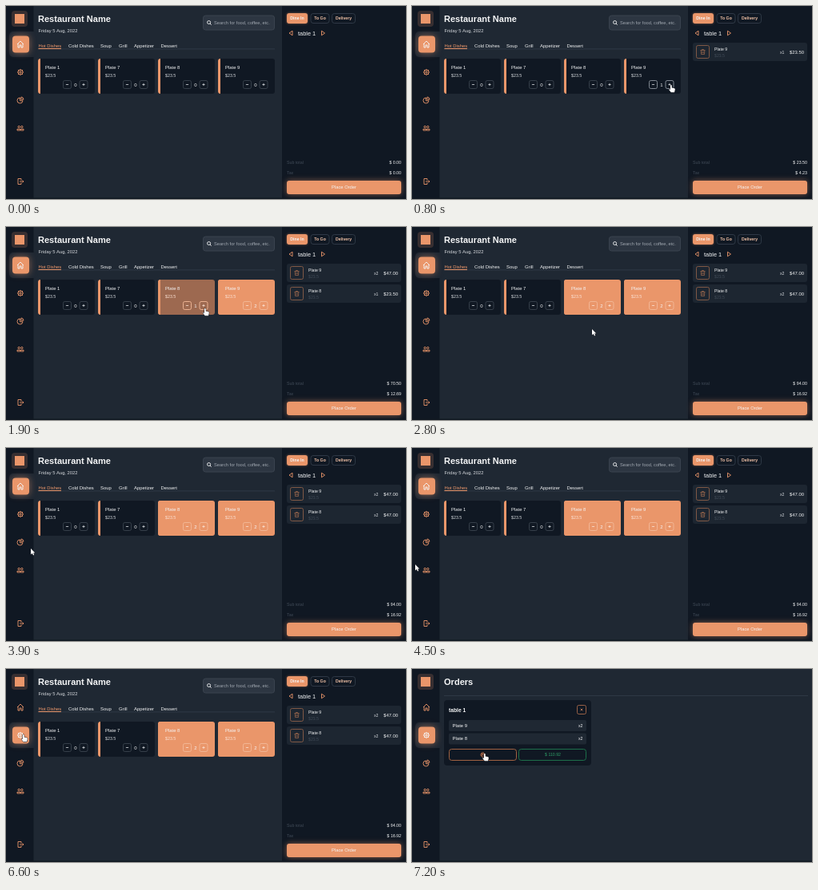
An HTML page with a canvas that plays this animation: 500 px wide and 242 px high, repeating every 8 s.

```html
<!DOCTYPE html>
<html lang="en">
<head>
<meta charset="utf-8">
<title>Restaurant order screen</title>
<style>
html, body { margin: 0; width: 100%; height: 100%; overflow: hidden; background: #1f2833; }
canvas { display: block; }
</style>
</head>
<body>
<canvas id="stage" width="500" height="242"></canvas>
<script>
const c = document.getElementById('stage').getContext('2d');
const LOOP = 8000, STEP = 100;
const ORANGE = '#ea966a', DARK = '#101823', MAIN = '#1f2833', LINE = '#333d4a', WHITE = '#f4f5f6', FAINT = '#414b58';

// Clicks on the plus buttons: time and card index
const CLICKS = [[800, 3], [1200, 3], [1800, 2], [2200, 2]];
const PLATES = [1, 7, 8, 9], PRICE = 23.5;
const NAV_CLICK = 6600, PAGE_CHANGE = 6700;

// Pointer stops: time, x, y, hand shape
const POINTER = [
  [200, 344, 150, 0], [300, 330, 114, 0], [500, 330, 114, 0], [600, 324, 99, 1],
  [1300, 324, 99, 1], [1600, 249, 102, 1], [2400, 249, 102, 1], [2600, 225, 128, 0],
  [2800, 225, 128, 0], [3000, 190, 140, 0], [3400, 190, 140, 0], [3600, 120, 136, 0],
  [3800, 120, 136, 0], [3900, 31, 126, 0], [4500, 4, 146, 0], [5000, 4, 146, 0],
  [5400, 92, 56, 1], [5600, 92, 56, 1], [5700, 76, 62, 0], [5900, 76, 62, 0],
  [6000, 48, 74, 0], [6300, 48, 74, 0], [6400, 22, 82, 1], [6600, 22, 82, 1], [7200, 91, 106, 1]
];

// Line icons centred on the origin
const ICONS = {
  home: 'M-4 0L0-4L4 0M-3-1V4H-1V1H1V4H3V-1',
  gear: 'M3 0A3 3 0 1 1-3 0A3 3 0 1 1 3 0M1.2 0A1.2 1.2 0 1 1-1.2 0A1.2 1.2 0 1 1 1.2 0M0-3V-4M0 3V4M-3 0H-4M3 0H4M2-2L3-3M-2-2L-3-3M2 2L3 3M-2 2L-3 3',
  pie: 'M-.5-3A3.5 3.5 0 1 0 3 .8H-.5ZM1-4A3.5 3.5 0 0 1 4-.8H1Z',
  users: 'M-.6-1.4A1.2 1.2 0 1 1-3-1.4A1.2 1.2 0 1 1-.6-1.4M3-1.4A1.2 1.2 0 1 1 .6-1.4A1.2 1.2 0 1 1 3-1.4M-4 3V1.3H-.3V3ZM.3 3V1.3H4V3Z',
  exit: 'M1-1.5V-3.5H-3V3.5H1V1.5M-1 0H4M2.6-1.4L4 0L2.6 1.4',
  trash: 'M-3-2H3M-1-2V-3H1V-2M-2.3-2L-2 3H2L2.3-2M-.7-.5V1.7M.7-.5V1.7',
  search: 'M1.6-.5A2 2 0 1 1-2.4-.5A2 2 0 1 1 1.6-.5M1 1L2.7 2.7',
  left: 'M2-2.8V2.8L-2 0Z',
  right: 'M-2-2.8V2.8L2 0Z',
  minus: 'M-1.6 0H1.6',
  plus: 'M-1.6 0H1.6M0-1.6V1.6',
  cross: 'M-1.3-1.3L1.3 1.3M1.3-1.3L-1.3 1.3',
  print: 'M-1.5-1V-2.5H1.5V-1M-1.5 1H-2.5V-1H2.5V1H1.5M-1.5 .3H1.5V2.5H-1.5Z'
};
const ARROW = new Path2D('M0 0V7.5L1.8 6L3 8.6L4.3 8L3.1 5.5H5.3Z');
const HAND = new Path2D('M-1 .8C-1-.4 .7-.4 .7 .8V3.6L4 4.3Q5 4.6 4.8 5.7L4 9.3H-.2L-2.8 6Q-2.6 4.7-1 5.8Z');

const clamp = v => Math.max(0, Math.min(1, v));
const money = v => v.toFixed(2);

function text(s, x, y, size, color = WHITE, align = 'left', weight = 400) {
  c.font = `${weight} ${size}px "Liberation Sans", Arial, sans-serif`;
  c.textAlign = align;
  c.fillStyle = color;
  c.fillText(s, x, y);
}

function rect(x, y, w, h, color) {
  c.fillStyle = color;
  c.fillRect(x, y, w, h);
}

function box(x, y, w, h, r, fill, stroke, glow = 0) {
  const inset = stroke ? .5 : 0;
  c.save();
  c.beginPath();
  c.roundRect(x + inset, y + inset, w - 2 * inset, h - 2 * inset, r);
  if (glow) { c.shadowColor = 'rgba(234,150,106,.55)'; c.shadowBlur = glow; }
  if (fill) { c.fillStyle = fill; c.fill(); }
  if (stroke) { c.strokeStyle = stroke; c.lineWidth = .9; c.stroke(); }
  c.restore();
}

function icon(name, x, y, color = ORANGE, width = .9) {
  c.save();
  c.translate(x, y);
  c.strokeStyle = color;
  c.lineWidth = width;
  c.stroke(new Path2D(ICONS[name]));
  c.restore();
}

function sidebar(active) {
  rect(0, 0, 34.5, 242, DARK);
  box(7, 6, 20, 20, 4, '#382f31');
  rect(11, 10, 12, 12, ORANGE);
  const y = 48 + 35 * active;
  box(4, y - 16, 36, 32, 5, MAIN);
  box(8, y - 10.5, 21, 21, 4, ORANGE, null, 9);
  ['home', 'gear', 'pie', 'users'].forEach((name, i) =>
    icon(name, 18, 48 + 35 * i, i === active ? WHITE : ORANGE));
  icon('exit', 18, 220);
}

function plate(i, count, fade, hover) {
  const x = 40 + 75 * i, pale = fade > .5;
  const edge = pale ? '#f3b999' : '#3a444f';
  box(x, 66, 71, 44, 3, DARK);
  c.save();
  c.beginPath();
  c.roundRect(x, 66, 71, 44, 3);
  c.clip();
  rect(x, 66, 3, 44, ORANGE);
  c.globalAlpha = fade;
  rect(x, 66, 71, 44, ORANGE);
  c.restore();
  text('Plate ' + PLATES[i], x + 9, 78.5, 5.9);
  text('$23.5', x + 9, 89, 5.3, pale ? '#fbe2d4' : '#d5d8dc');
  ['minus', 'plus'].forEach((name, k) => {
    const cx = x + 36.5 + 20.5 * k;
    box(cx - 5.5, 93, 11, 11, 2, null, hover && !pale ? '#8d959e' : edge);
    icon(name, cx, 98.5, pale ? '#fbe2d4' : '#d5d8dc', .8);
  });
  text(count, x + 47, 100.7, 6, WHITE, 'center');
}

function menu(t, counts) {
  text('Restaurant Name', 40, 20, 11.05, WHITE, 'left', 700);
  text('Friday 5 Aug, 2022', 40.5, 33, 5.8, '#d9dce0');
  box(246, 11.5, 90, 19, 3, '#2d3642', '#3d4651');
  icon('search', 254, 21, WHITE);
  text('Search for food, coffee, etc.', 260, 23, 5.7, '#a0a7b0');
  rect(40, 53.5, 296, .8, LINE);
  [['Hot Dishes', 40.5], ['Cold Dishes', 78], ['Soup', 118], ['Grill', 141], ['Appetizer', 160], ['Dessert', 193.5]]
    .forEach(([s, x], i) => text(s, x, 51.5, 5.9, i ? WHITE : ORANGE));
  rect(40.5, 53, 28.5, 1, ORANGE);
  counts.forEach((n, i) => {
    const first = CLICKS.find(k => k[1] === i);
    const fade = first ? clamp((t - first[0]) / 155) : 0;
    plate(i, n, fade, i === 3 && t >= 600 && t < 1400);
  });
}

function cart(counts) {
  rect(345, 0, 155, 242, DARK);
  [['Dine In', 351, 26], ['To Go', 380.5, 24], ['Delivery', 407, 30]].forEach(([s, x, w], i) => {
    box(x, 9, w, 13, 3, i ? null : ORANGE, i ? LINE : null, i ? 0 : 3);
    text(s, x + w / 2, 17.4, 5.2, i ? '#efc0a5' : WHITE, 'center', 700);
  });
  icon('left', 356, 34);
  icon('right', 396.5, 34);
  text('table 1', 365, 37, 7.4);

  [3, 2].filter(i => counts[i]).forEach((i, row) => {
    const y = 46 + 26 * row;
    box(351, y, 143, 23, 3, '#1d2631');
    box(355, y + 3, 17, 17, 2, null, '#8b5e48');
    icon('trash', 363.5, y + 11.5, '#a56d50', .7);
    text('Plate ' + PLATES[i], 378, y + 9.5, 5.2);
    text('$23.5', 378, y + 17.5, 5.2, FAINT);
    text('x' + counts[i], 465.5, y + 13.5, 5.2, '#d5d8dc', 'right');
    text('$' + money(counts[i] * PRICE), 490, y + 13.5, 5.9, WHITE, 'right');
  });

  const sum = PRICE * counts.reduce((a, b) => a + b);
  text('Sub total', 351, 198, 5.3, FAINT);
  text('$ ' + money(sum), 494, 198, 5.3, WHITE, 'right');
  text('Tax', 351, 211, 5.3, FAINT);
  text('$ ' + money(sum * .18), 494, 211, 5.3, WHITE, 'right');
  box(351, 219, 143, 17, 3, ORANGE, null, 7);
  text('Place Order', 422.5, 229.3, 5.8, WHITE, 'center');
}

function orders(counts) {
  text('Orders', 40, 20, 11.05, WHITE, 'left', 700);
  rect(40, 33, 455, .8, LINE);
  box(40, 39, 184, 82, 4, DARK);
  text('table 1', 46, 53.5, 6.7, WHITE, 'left', 700);
  box(206, 45, 12, 12, 2, null, '#a9694a');
  icon('cross', 212, 51, ORANGE, .7);
  [3, 2].forEach((i, row) => {
    const y = 64 + 16.5 * row;
    box(46, y, 172, 14, 2, MAIN);
    text('Plate ' + PLATES[i], 50.5, y + 8.8, 6);
    text('x' + counts[i], 213.5, y + 8.8, 5.2, WHITE, 'right');
  });
  box(46, 100, 85, 15, 3, null, '#b06a45');
  icon('print', 88.5, 107.5, '#c9774e', .8);
  box(133, 100, 85, 15, 3, null, '#1f7a4f');
  text('$ 110.92', 176, 109.4, 5.2, '#2fa069', 'center');
}

function pointer(t) {
  if (t < POINTER[0][0]) return;
  const i = POINTER.findLastIndex(p => p[0] <= t);
  const a = POINTER[i], b = POINTER[i + 1] || a;
  const k = b === a ? 0 : (t - a[0]) / (b[0] - a[0]);
  const ease = k * k * (3 - 2 * k);
  const shape = a[3] ? HAND : ARROW;
  c.save();
  c.translate(a[1] + (b[1] - a[1]) * ease, a[2] + (b[2] - a[2]) * ease);
  c.lineWidth = 1;
  c.strokeStyle = '#10151c';
  c.stroke(shape);
  c.fillStyle = '#fff';
  c.fill(shape);
  c.restore();
}

function draw(t) {
  const counts = PLATES.map((_, i) => CLICKS.filter(k => k[1] === i && k[0] <= t).length);
  rect(0, 0, 500, 242, MAIN);
  sidebar(t >= NAV_CLICK ? 1 : 0);
  if (t < PAGE_CHANGE) {
    menu(t, counts);
    cart(counts);
  } else {
    orders(counts);
  }
  rect(0, 240.5, 500, 1.5, '#111821');
  pointer(t);
}

function tick() {
  const t = performance.now() % LOOP;
  draw(Math.floor(t / STEP) * STEP);
  requestAnimationFrame(tick);
}
tick();
</script>
</body>
</html>
```
